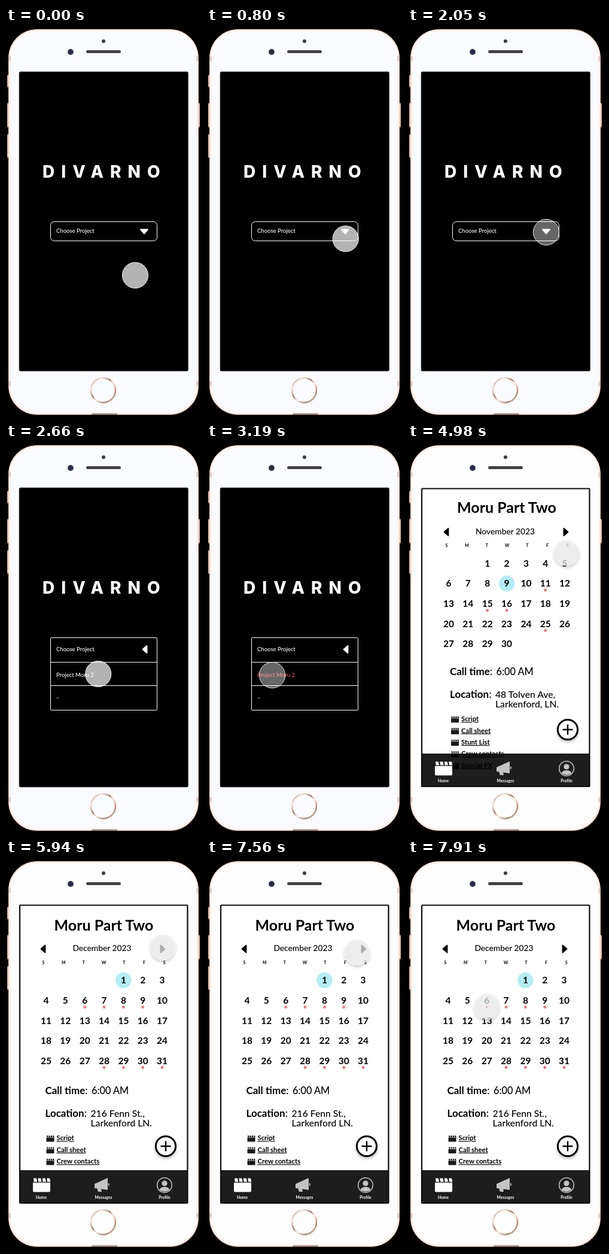
An HTML page that plays this animation: 326 by 648 pixels, repeating every 8 s.

```html
<!DOCTYPE html>
<html lang="en">
<head>
<meta charset="utf-8">
<title>Phone prototype</title>
<style>
  html, body { margin: 0; width: 100%; height: 100%; overflow: hidden; background: #000; }
  svg { display: block; width: 326px; height: 648px; }
  text { font-family: Lato, "Open Sans", sans-serif; font-weight: 500; white-space: pre; }
  .b { font-weight: 700; }
  .mid { text-anchor: middle; }
  .logo { font: 800 28px Inter, sans-serif; letter-spacing: 11px; }
  .link { font-size: 11.3px; font-weight: 700; text-decoration: underline; }
</style>
</head>
<body>
<svg id="stage" viewBox="0 0 326 648" xmlns="http://www.w3.org/2000/svg"></svg>
<script>
const LOOP = 8000;
const OPEN_AT = 2130, HOVER_AT = 2880, HOME_AT = 3280, NEXT_AT = 5940;

const rect = (x, y, w, h, r, attrs) =>
  `<rect x="${x}" y="${y}" width="${w}" height="${h}" rx="${r}" ${attrs}/>`;
const dot = (x, y, r, attrs) => `<circle cx="${x}" cy="${y}" r="${r}" ${attrs}/>`;
const path = (d, attrs = '') => `<path d="${d}" ${attrs}/>`;
const label = (x, y, size, str, cls = '', attrs = '') =>
  `<text x="${x}" y="${y}" font-size="${size}" class="${cls}" ${attrs}>${str}</text>`;
const group = (x, y, body, attrs = '') =>
  `<g transform="translate(${x} ${y})" ${attrs}>${body}</g>`;

// Rounded triangle pointing left, turned by an angle
const arrow = (x, y, turn, color) =>
  `<path transform="translate(${x} ${y}) rotate(${turn})" d="M-3.4 0 3.4 -5.9V5.9Z"
    fill="${color}" stroke="${color}" stroke-width="2" stroke-linejoin="round"/>`;

function clapper(x, y, scale, color) {
  let strip = '';
  for (let i = 0; i < 4; i++) strip += `M${i * 7.4 + 1} 1h4.8l1.4 6h-5.4Z`;
  return `<g transform="translate(${x} ${y}) scale(${scale})" fill="${color}">` +
    path(strip) + path('M0 8.2H29V22q0 2-2 2H2q-2 0-2-2Z') + '</g>';
}

function phone() {
  const buttons = [[2, 78, 21], [2, 125, 41], [2, 177, 40], [320.5, 125, 41]]
    .map(([x, y, h]) => rect(x, y, 3.5, h, 1.5, 'fill="#e9c4b4"') +
      rect(x, y, 3.5, 2, 1, 'fill="#a98070"') + rect(x, y + h - 2, 3.5, 2, 1, 'fill="#a98070"'))
    .join('');
  const bands = [47, 590].map(y =>
    rect(4, y, 4, 8, 0, 'fill="#e3c3b6"') + rect(318, y, 4, 8, 0, 'fill="#e3c3b6"')).join('');
  return buttons +
    rect(4.5, 2.5, 317, 643, 47, 'fill="#fff1ea" stroke="#f6d3c5"') + bands +
    rect(7.5, 5.5, 311, 636.5, 44, 'id="face" fill="#fafbfe"') +
    rect(143, 643.5, 43, 2.5, 1, 'fill="#a8877a"') +
    dot(163, 22, 3, 'fill="#3b3b40"') +
    dot(108, 40, 4.9, 'fill="#30343f"') + dot(108, 40, 2.6, 'fill="#1f2a56"') +
    rect(134, 37, 58, 5, 2.5, 'fill="#434347"') +
    dot(162.5, 605, 20.5, 'fill="none" stroke="url(#ring)" stroke-width="2.6"');
}

function startScreen() {
  const line = 'fill="none" stroke="#fff"';
  const closed = rect(74.5, 323.5, 178, 32, 6, line) +
    label(84, 342.3, 9.5, 'Choose Project') +
    arrow(231, 340, -90, '#fff');
  const open = rect(74.5, 323.5, 178, 121, 1, line) +
    path('M74.5 364.5h178M74.5 403.5h178', line) +
    label(84, 346.3, 9.5, 'Choose Project') +
    arrow(232, 343, 0, '#fff') +
    label(84, 389.3, 9.5, 'Project Moru 2', '', 'id="choice"') +
    label(84, 425, 9.5, '..');
  return `<g id="start" fill="#fff">` +
    rect(22.5, 73.5, 281.5, 499, 2, 'fill="#000" stroke="#171b19" stroke-width="1.6"') +
    '<text class="logo" x="61" y="250">DIVARNO</text>' +
    `<g id="closed">${closed}</g><g id="open">${open}</g></g>`;
}

function calendar(c) {
  const colX = i => c.x + i * 32.35;
  const rowY = i => c.y + i * 33.6;
  let out = label(c.title[0], c.title[1], 25, 'Moru Part Two', 'b mid') +
    label(c.head - 1.5, c.headY + 3.8, 13.8, c.month, 'mid') +
    arrow(c.head - 100, c.headY, 0, '#000') + arrow(c.head + 100, c.headY, 180, '#000');
  [...'SMTWTFS'].forEach((d, i) => {
    out += label(c.head - 99.5 + i * 33.7, c.weekY, 7, d, 'b mid');
  });
  for (let day = 1; day <= c.days; day++) {
    const cell = day - 1 + c.first;
    const x = colX(cell % 7), y = rowY(Math.floor(cell / 7));
    if (day === c.today) out += dot(x, y, 13.2, 'fill="#b3edf6"');
    if (c.marks.includes(day)) out += dot(x, y + 11.3, 2.4, 'fill="#fb6f70"');
    out += label(x, y + 5.5, 15.5, day, 'b mid');
  }
  return out;
}

function details(d) {
  const [x, y] = d.at;
  let out = label(x, y, 17, 'Call time<tspan font-weight="500">:</tspan>', 'b') +
    label(x + 77.5, y, 16.3, '6:00 AM') +
    label(x, y + 38, 17, 'Location<tspan font-weight="500">:</tspan>', 'b');
  d.address.forEach((row, i) => {
    out += label(x + 76, y + 38.5 + i * 16, 15.7, row);
  });
  d.links.forEach((name, i) => {
    const cy = d.linkY + i * 19.4;
    out += clapper(x + 2, cy - 5, 0.45, '#1a1a1a') +
      label(x + 19, cy + 3.6, 11.3, name, 'link');
  });
  return out;
}

function addButton(y) {
  return dot(267, y, 16.6, 'fill="#fff" stroke="#000" stroke-width="3" filter="url(#lift)"') +
    path(`M258.5 ${y}h17M267 ${y - 8.5}v17`, 'stroke="#000" stroke-width="2.4"');
}

function navBar(y) {
  const horn = path('M0 10 22 0V20L0 17Z') + path('M4 17l2 6h6l-1-5Z') +
    path('M23 8q4 2 0 6Z');
  const profile = dot(0, 0, 12.3, 'fill="none" stroke="#c4c4c4" stroke-width="1.5"') +
    dot(0, -3, 4.6) + path('M-8.5 8Q-7 3 0 3T8.5 8Q0 14-8.5 8Z');
  const names = [['Home', 59], ['Messages', 163], ['Profile', 265]]
    .map(([name, x]) => label(x, y + 48, 6.7, name, 'b mid', 'fill="#fff"')).join('');
  return rect(24, y, 279, 54, 0, 'fill="#000" fill-opacity=".885"') +
    clapper(45, y + 12.5, 1, '#fff') +
    group(148, y + 13, horn, 'fill="#c4c4c4"') +
    group(265, y + 25, profile, 'fill="#c4c4c4"') + names;
}

function dayScreen(id, s) {
  return `<g id="${id}">` + rect(23, s.top, 280.5, 497.5, 1, 'fill="#fff"') +
    calendar(s) + details(s) + addButton(s.fab) + navBar(s.nav) +
    rect(23, s.top, 280.5, 497.5, 1, 'fill="none" stroke="#0c0c0c" stroke-width="2.2"') + '</g>';
}

const november = {
  top: 74.5, title: [165, 114.5], month: 'November 2023', head: 164, headY: 147, weekY: 172.4,
  x: 68, y: 199.3, first: 2, days: 30, today: 9, marks: [11, 15, 16, 25],
  at: [70, 385.5], address: ['48 Tolven Ave,', 'Larkenford, LN.'], linkY: 459.5,
  links: ['Script', 'Call sheet', 'Stunt List', 'Crew contacts', 'Special FX'],
  fab: 477, nav: 517
};
const december = {
  top: 75.5, title: [163.5, 118], month: 'December 2023', head: 162, headY: 148.5, weekY: 174,
  x: 67, y: 200.8, first: 4, days: 31, today: 1, marks: [6, 7, 8, 9, 28, 29, 30, 31],
  at: [65.5, 390.5], address: ['216 Fenn St.,', 'Larkenford LN.'], linkY: 464.8,
  links: ['Script', 'Call sheet', 'Crew contacts'],
  fab: 478, nav: 518
};

const stage = document.getElementById('stage');
stage.innerHTML = `<defs>
  <linearGradient id="ring" x1="0" y1="0" x2="1" y2="1">
    <stop offset="0" stop-color="#b98a74"/><stop offset=".22" stop-color="#f3e3db"/>
    <stop offset=".42" stop-color="#b07a62"/><stop offset=".55" stop-color="#f8eee9"/>
    <stop offset=".78" stop-color="#b5836c"/><stop offset="1" stop-color="#ead3c8"/>
  </linearGradient>
  <filter id="lift" x="-30%" y="-30%" width="160%" height="160%">
    <feDropShadow dx="0" dy="3" stdDeviation="2" flood-color="#000" flood-opacity=".25"/>
  </filter></defs>` +
  rect(0, 0, 326, 648, 0, 'fill="#000"') + phone() + startScreen() +
  dayScreen('nov', november) + dayScreen('dec', december) +
  `<g id="cursor">${dot(0, 0, 21.6, 'id="touch"')}</g>`;

const el = id => document.getElementById(id);
const show = (id, on) => el(id).setAttribute('display', on ? 'inline' : 'none');
const set = (id, attrs) => {
  for (const key in attrs) el(id).setAttribute(key, attrs[key]);
};

// Time followed by values; eased between neighbours
const route = [
  [0, 216, 413], [390, 216, 413], [890, 233, 347], [1820, 233, 347], [2020, 231, 341],
  [2420, 231, 341], [2800, 122, 402], [3010, 109, 386], [3190, 109, 386], [3280, 109, 388],
  [4460, 109, 388], [4980, 265, 182], [5330, 273, 155], [5400, 273, 155], [5850, 262, 146],
  [7480, 262, 146], [7910, 132, 245], [LOOP, 132, 245]
];
const opacity = [
  [0, .7], [1850, .7], [2030, .4], [2130, .4], [2220, .7], [3100, .7], [3190, .4],
  [3280, .7], [LOOP, .7]
];

function sample(keys, t) {
  const i = keys.findIndex(k => k[0] > t);
  const a = keys[i - 1], b = keys[i];
  const p = (t - a[0]) / (b[0] - a[0]);
  const e = (1 - Math.cos(Math.PI * p)) / 2;
  return a.slice(1).map((v, n) => v + (b[n + 1] - v) * e);
}

function render(t) {
  const dark = t < HOME_AT;
  show('start', dark);
  show('closed', t < OPEN_AT);
  show('open', t >= OPEN_AT);
  show('nov', !dark && t < NEXT_AT);
  show('dec', t >= NEXT_AT);
  set('choice', { fill: t < HOVER_AT ? '#fff' : '#f4494d' });
  set('face', { fill: dark ? '#fafbfe' : '#fdfdfd' });

  const [x, y] = sample(route, t);
  set('cursor', {
    transform: `translate(${x.toFixed(2)} ${y.toFixed(2)})`,
    filter: dark ? 'none' : 'url(#lift)'
  });
  set('touch', {
    fill: dark ? '#fff' : '#eee',
    'fill-opacity': sample(opacity, t)[0],
    stroke: dark ? '#fff' : 'none',
    'stroke-opacity': .85
  });
}

const began = performance.now();
function tick() {
  render((performance.now() - began) % LOOP);
  requestAnimationFrame(tick);
}
tick();
</script>
</body>
</html>
```
